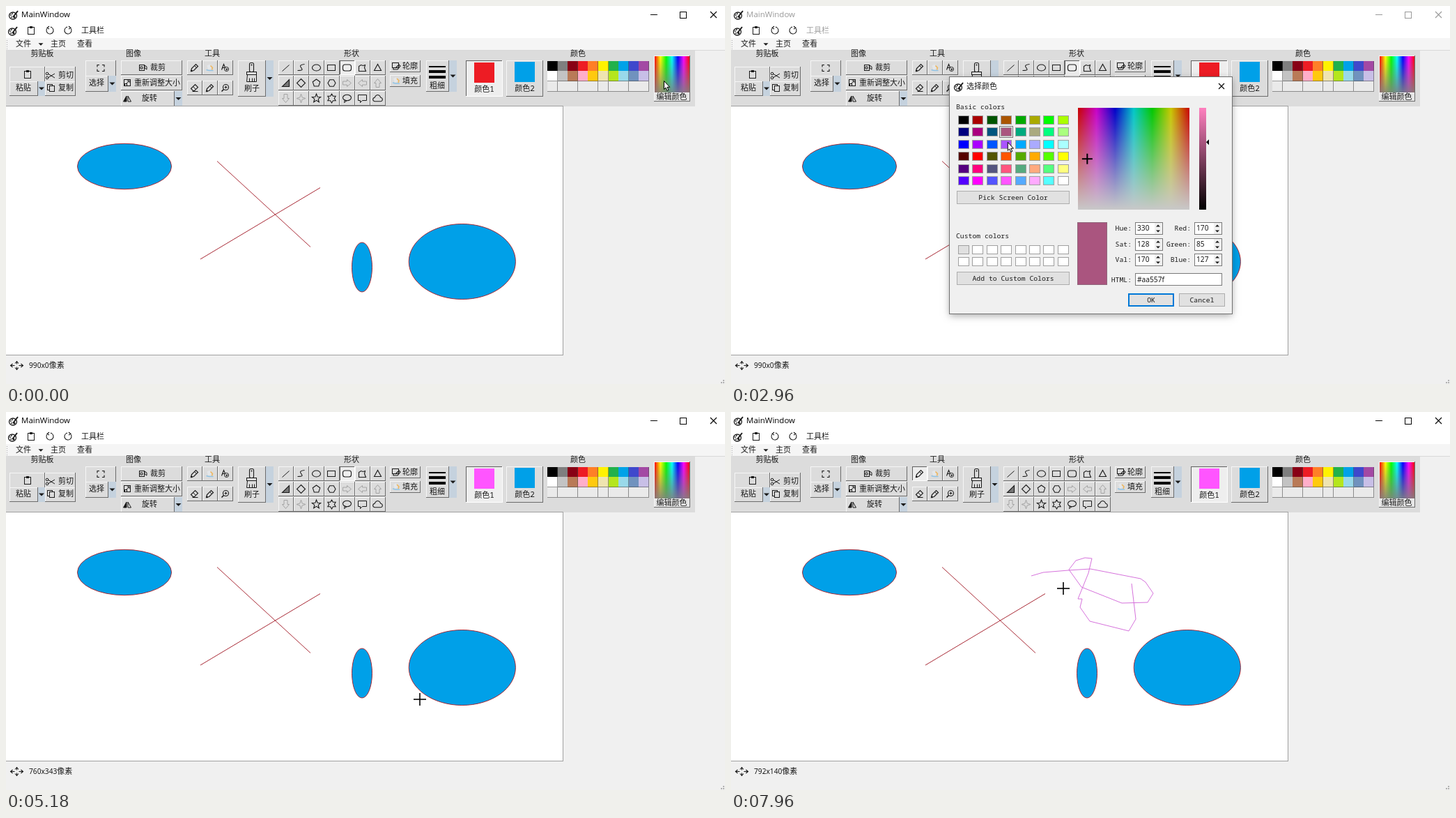
Animation, 1032 px wide and 542 px high, one loop 8000 ms. Source, as an HTML page with a canvas:

```html
<!DOCTYPE html>
<html lang="zh">
<head>
<meta charset="utf-8">
<title>Paint window</title>
<style>
html, body { margin: 0; width: 100%; height: 100%; overflow: hidden; background: #f0f0f0; }
canvas { display: block; }
</style>
</head>
<body>
<canvas id="stage" width="1032" height="542"></canvas>
<script>
const g = document.getElementById('stage').getContext('2d');
const LOOP = 8000, STEP = 70, PHASE = 50;
const OPEN = 400, CLOSE = 5110, PRESS = 6200, DRAW = 6840, DRAW_END = 7750;
const CJK = '11px "Noto Sans Mono", "Noto Sans CJK SC", "Noto Sans CJK", sans-serif';
const MONO = '9.75px "Noto Sans Mono", "Noto Sans CJK SC", "Noto Sans CJK", monospace';
const DIGITS = '10.2px "Noto Sans", sans-serif';
const TITLE = '11.5px "Open Sans", "Noto Sans", sans-serif';
const INK = '#1a1a1a', FACE = '#dcdcdc', BLUE = '#00a0e8', RED_LINE = '#aa2c38';

// ---- drawing helpers ----
function fill(x, y, w, h, c) { g.fillStyle = c; g.fillRect(x, y, w, h); }
function frame(x, y, w, h, c, lw = 1) {
  g.strokeStyle = c; g.lineWidth = lw;
  g.strokeRect(x + lw / 2, y + lw / 2, w - lw, h - lw);
}
function box(x, y, w, h, bg, edge, lw) { fill(x, y, w, h, bg); frame(x, y, w, h, edge, lw); }
function text(s, x, y, font = CJK, align = 'left', c = INK) {
  g.font = font; g.textAlign = align; g.textBaseline = 'middle'; g.fillStyle = c;
  g.fillText(s, x, y + 0.5);
}
function path(pts, c = INK, lw = 1, closed = false, paint = null) {
  g.beginPath();
  pts.forEach(([x, y]) => g.lineTo(x, y));
  if (closed) g.closePath();
  if (paint) { g.fillStyle = paint; g.fill(); }
  if (c) { g.strokeStyle = c; g.lineWidth = lw; g.stroke(); }
}
function oval(x, y, rx, ry, c = INK, lw = 1, paint = null) {
  g.beginPath(); g.ellipse(x, y, rx, ry, 0, 0, 2 * Math.PI);
  if (paint) { g.fillStyle = paint; g.fill(); }
  if (c) { g.strokeStyle = c; g.lineWidth = lw; g.stroke(); }
}
function at(x, y, pts) { return pts.map(p => [x + p[0], y + p[1]]); }
function ring(x, y, n, r, inner = r, turn = -Math.PI / 2) {
  const count = inner === r ? n : 2 * n;
  return Array.from({ length: count }, (_, i) => {
    const a = turn + i * 2 * Math.PI / count, d = i % 2 && count > n ? inner : r;
    return [x + d * Math.cos(a), y + d * Math.sin(a)];
  });
}
function button(x, y, w, h, down = false, bg = FACE) {
  fill(x, y, w, h, down ? '#eeeeee' : bg);
  const [a, b] = down ? ['#606060', '#ffffff'] : ['#f6f6f6', '#6c6c6c'];
  fill(x, y, w, 1, a); fill(x, y, 1, h, a);
  fill(x, y + h - 1, w, 1, b); fill(x + w - 1, y, 1, h, b);
}
function wedge(x, y, s = 4, up = false) {
  const d = up ? -s / 2 : s / 2;
  path([[x - s, y - d], [x + s, y - d], [x, y + d]], null, 0, true, INK);
}
function dropdown(x, y, w, h) {
  fill(x, y, w, h, '#c5d2de');
  wedge(x + w / 2, y + h / 2, 4);
}
function plus(x, y, r, lw) {
  path([[x - r, y], [x + r, y]], '#000', lw);
  path([[x, y - r], [x, y + r]], '#000', lw);
}

// ---- icons ----
function paletteIcon(x, y) {
  oval(x - 1, y + 1, 5.5, 5, INK, 1.3);
  for (const [a, b] of [[-4, 0], [-2, -2], [-3, 3]]) oval(x + a, y + b, 0.9, 0.9, null, 0, INK);
  path([[x - 1, y + 3], [x + 6, y - 6]], INK, 2);
  oval(x + 1, y + 3, 1.5, 1.5, null, 0, INK);
}
function clipIcon(x, y) {
  frame(x - 5, y - 5, 10, 11, INK);
  fill(x - 2, y - 6, 4, 3, INK);
}
function turnIcon(x, y, dir) {
  g.save();
  g.translate(x, y); g.scale(dir, 1);
  g.beginPath(); g.arc(0, 0, 5, -0.5, 4.5);
  g.strokeStyle = INK; g.lineWidth = 1.1; g.stroke();
  path([[1, -6], [4, -3.5], [1, -2]], INK, 1.1);
  g.restore();
}
function scissorsIcon(x, y) {
  path(at(x, y, [[-4, -3], [6, 3]])); path(at(x, y, [[-4, 3], [6, -3]]));
  oval(x - 5, y - 3, 1.8, 1.8); oval(x - 5, y + 3, 1.8, 1.8);
}
function copyIcon(x, y) {
  frame(x - 5, y - 5, 8, 9, INK);
  box(x - 2, y - 3, 8, 9, FACE, INK);
}
function selectIcon(x, y) {
  for (const a of [-1, 1]) for (const b of [-1, 1])
    path(at(x, y, [[a * 2, b * 4.5], [a * 5, b * 4.5], [a * 5, b * 1.5]]), INK, 1.1);
}
function cropIcon(x, y) {
  frame(x - 5, y - 4, 8, 9, INK);
  path(at(x, y, [[-3, -1], [0, -1], [0, 2], [-3, 2]]), INK, 1, true);
  path(at(x, y, [[3, -3], [6, -1], [6, 3], [3, 1]]), INK, 1, true);
}
function resizeIcon(x, y) {
  frame(x - 5, y - 5, 10, 10, INK);
  frame(x - 4, y + 1, 4, 4, INK);
  path(at(x, y, [[-1, 1], [3, -3], [0, -3]])); path(at(x, y, [[3, -3], [3, 0]]));
}
function flipIcon(x, y) {
  path(at(x, y, [[-1, -4], [-1, 4], [-5.5, 4]]), INK, 1, true, INK);
  path(at(x, y, [[1, -4], [1, 4], [5.5, 4]]), INK, 1, true);
}
function pencilIcon(x, y) {
  path(at(x, y, [[-5, 5], [-4, 1], [2, -5], [5, -2], [-1, 4]]), INK, 1.2, true);
  path(at(x, y, [[0, -3], [3, 0]]));
  path(at(x, y, [[-5, 5], [-3, 4]]), INK, 2);
}
function bucketIcon(x, y) {
  path(at(x, y, [[-4, -3], [0, -5], [2, 1], [-2, 3]]), null, 0, true, '#e4e7ea');
  path(at(x, y, [[-5, 3], [-1, 4], [5, 4]]), '#8fc3e6', 1.4);
  path(at(x, y, [[1, -3], [4, 0], [3, 3]]), '#f0b65a', 1.5);
}
function letterIcon(x, y) {
  path(at(x, y, [[-5, 3], [-2, -5], [1, 2]]), INK, 1.1); path(at(x, y, [[-4, 0], [0, 0]]));
  oval(x + 2, y + 2, 3, 3, INK, 1, FACE);
  path(at(x, y, [[1, 2], [4, 2]])); path(at(x, y, [[2, 1], [2, 4]]));
}
function eraserIcon(x, y) {
  path(at(x, y, [[-5, 1], [1, -5], [5, -1], [0, 4], [-2, 4]]), INK, 1.1, true);
  path(at(x, y, [[-2, -2], [2, 2]])); path(at(x, y, [[-3, 5], [5, 5]]));
}
function lensIcon(x, y) {
  oval(x + 1, y - 1, 4, 4, INK, 1.1);
  path(at(x, y, [[-5, 5], [-2, 2]]), INK, 1.6);
  path(at(x, y, [[-1, -1], [3, -1]])); path(at(x, y, [[1, -3], [1, 1]]));
}
function brushIcon(x, y) {
  rounded(x - 2.5, y - 13.5, 6, 13, 2);
  oval(x + 0.5, y - 10.5, 0.7, 0.7);
  frame(x - 7, y - 1, 15, 5, INK);
  path(at(x + 0.5, y + 0.5, [[-6, 3], [-7, 13], [7, 13], [7, 3]]));
  for (const a of [-3, 1, 4]) path(at(x + 0.5, y + 0.5, [[a, 8], [a, 13]]));
}
function outlineIcon(x, y) {
  frame(x - 6, y - 5, 10, 8, INK);
  path(at(x, y, [[-4, 3], [-4, 5], [2, 5], [6, 0], [4, -2], [-1, 3]]), INK, 1.1);
}
function moveIcon(x, y) {
  for (let i = 0; i < 4; i++) {
    const c = Math.round(Math.cos(i * Math.PI / 2)), s = Math.round(Math.sin(i * Math.PI / 2));
    const kx = c * 9, ky = s * 6;
    path([[x + c * 3, y + s * 2], [x + kx, y + ky]], INK, 1.1);
    path([[x + kx - c * 3 - s * 2.5, y + ky - s * 3 + c * 2.5], [x + kx, y + ky],
      [x + kx - c * 3 + s * 2.5, y + ky - s * 3 - c * 2.5]], INK, 1.1);
  }
}
const ARROW = [[-6, -2.5], [0, -2.5], [0, -5], [6, 0], [0, 5], [0, 2.5], [-6, 2.5]];
function blockArrow(x, y, turns) {
  const c = Math.cos(turns * Math.PI / 2), s = Math.sin(turns * Math.PI / 2);
  path(ARROW.map(([a, b]) => [x + a * c - b * s, y + a * s + b * c]), '#a4a4a4', 1, true);
}
function rounded(x, y, w, h, r) {
  g.beginPath(); g.roundRect(x, y, w, h, r);
  g.strokeStyle = INK; g.lineWidth = 1.1; g.stroke();
}
const SHAPES = [
  (x, y) => path(at(x, y, [[-5, 5], [5, -4]])),
  (x, y) => {
    g.beginPath(); g.moveTo(x - 5, y + 4);
    g.bezierCurveTo(x + 12, y + 4, x - 11, y - 3, x + 5, y - 5);
    g.strokeStyle = INK; g.lineWidth = 1.1; g.stroke();
  },
  (x, y) => oval(x, y, 6, 4.5, INK, 1.1),
  (x, y) => frame(x - 6.5, y - 4.5, 12, 9, INK),
  (x, y) => rounded(x - 6, y - 4.5, 12, 9, 3),
  (x, y) => path(at(x, y, [[-5, 5], [-5, -2], [-2, -4], [1, -3], [4, -4], [3, 0], [5, 5]]), INK, 1.1, true),
  (x, y) => path(at(x, y, [[-5, 4], [0, -5], [5, 4]]), INK, 1.1, true),
  (x, y) => path(at(x, y, [[-5, 5], [5, 5], [5, -5]]), INK, 1.1, true, '#777'),
  (x, y) => path(ring(x, y, 4, 6), INK, 1.1, true),
  (x, y) => path(ring(x, y, 5, 5.5), INK, 1.1, true),
  (x, y) => path(ring(x, y, 6, 5.5, 5.5, 0), INK, 1.1, true),
  (x, y) => blockArrow(x, y, 0),
  (x, y) => blockArrow(x, y, 2),
  (x, y) => blockArrow(x, y, 3),
  (x, y) => blockArrow(x, y, 1),
  (x, y) => path(ring(x, y, 4, 6.5, 2.2), '#a4a4a4', 1, true),
  (x, y) => path(ring(x, y, 5, 6.5, 2.8), INK, 1.1, true),
  (x, y) => path(ring(x, y, 6, 6.5, 3.8), INK, 1.1, true),
  (x, y) => {
    oval(x, y - 1, 6, 4.2, INK, 1.1);
    path(at(x, y, [[-3, 2], [-4, 6], [0, 3]]), INK, 1);
  },
  (x, y) => path(at(x, y, [[-6, -5], [6, -5], [6, 3], [0, 3], [-3, 6], [-3, 3], [-6, 3]]), INK, 1, true),
  (x, y) => {
    g.beginPath();
    g.arc(x - 4, y + 1.5, 2.8, 1.6, 4.6); g.arc(x, y - 1, 4, 3.6, 6); g.arc(x + 4, y + 1.5, 2.8, -1.4, 1.6);
    g.closePath(); g.strokeStyle = INK; g.lineWidth = 1.1; g.stroke();
  }
];

// ---- colour ----
const css = c => `rgb(${c.join()})`;
const hex = c => '#' + c.map(v => v.toString(16).padStart(2, '0')).join('');
function toHsv([r, gr, b]) {
  const max = Math.max(r, gr, b), d = max - Math.min(r, gr, b);
  let h = 0;
  if (d) h = max === r ? ((gr - b) / d + 6) % 6 : max === gr ? (b - r) / d + 2 : (r - gr) / d + 4;
  return [Math.round(h * 60), max ? Math.round(255 * d / max) : 0, max];
}
// index runs down the columns: blue fastest, then red, then green
function basic(i) {
  return [Math.floor(i / 3) % 4 * 85, Math.floor(i / 12) * 85, Math.floor(i % 3 * 127.5)];
}
function spectrum(x, y, w, h, v, grey, reverse = false) {
  const hue = g.createLinearGradient(x, 0, x + w, 0);
  const stops = [[v, 0, 0], [v, 0, v], [0, 0, v], [0, v, v], [0, v, 0], [v, v, 0], [v, 0, 0]];
  if (reverse) stops.reverse();
  stops.forEach((c, i) => hue.addColorStop(i / 6, css(c)));
  fill(x, y, w, h, hue);
  const fade = g.createLinearGradient(0, y, 0, y + h);
  fade.addColorStop(0, `rgba(${grey},${grey},${grey},0)`);
  fade.addColorStop(1, `rgba(${grey},${grey},${grey},${reverse ? 0.9 : 1})`);
  fill(x, y, w, h, fade);
}
const PALETTE = ('000000 7f7f7f 880015 ed1c24 ff7f27 fff200 22b14c 00a2e8 3f48cc a349a4 ' +
  'ffffff c3c3c3 b97a57 ffaec9 ffc90e efe4b0 b5e61d 99d9ea 7092be c8bfe7').split(' ');

// ---- motion: [time, x, y] ----
const TRACK = [
  [0, 944, 107], [680, 944, 107], [900, 560, 190], [1170, 383, 222], [1240, 382, 222],
  [1860, 398, 172], [2750, 398, 172], [3300, 394, 246], [3650, 394, 246], [3830, 411, 254],
  [4410, 594, 412], [5250, 594, 412], [5320, 604, 405], [5860, 275, 158], [6000, 271, 91],
  [6240, 271, 91], [6700, 431, 235], [DRAW, 431, 235]
];
const STROKE = [
  [431, 235], [448, 230], [484, 227], [516, 225], [588, 239], [595, 244], [606, 260], [598, 273],
  [561, 274], [503, 251], [485, 226], [495, 213], [508, 209], [518, 210], [513, 231],
  [498, 268], [504, 268], [501, 280], [515, 300], [571, 314], [581, 297], [575, 246]
];
STROKE.forEach(([x, y], i) => {
  if (i) TRACK.push([DRAW + i / (STROKE.length - 1) * (DRAW_END - DRAW), x, y]);
});
TRACK.push([7820, 556, 226], [7890, 515, 222], [7960, 477, 253], [LOOP, 477, 253]);

function pointer(t) {
  const i = Math.max(1, TRACK.findIndex(k => k[0] > t));
  const [t0, x0, y0] = TRACK[i - 1], [t1, x1, y1] = TRACK[i];
  const k = (t - t0) / (t1 - t0);
  return [x0 + (x1 - x0) * k, y0 + (y1 - y0) * k];
}
function status(t, [x, y], onCanvas) {
  if (t < CLOSE) return '990x0';
  if (t >= 7960) return '792x140';
  return onCanvas ? `${Math.round(x * 1.28)}x${Math.round((y - 144) * 1.28)}` : '352x18';
}

// ---- main window ----
function header(t, modal) {
  const c = modal ? '#999' : '#000';
  fill(0, 0, 1032, 46, '#fff');
  fill(0, 46, 1032, 18, '#f5f5f5');
  fill(0, 63, 1032, 1, '#d8d8d8');
  paletteIcon(11, 13);
  text('MainWindow', 22, 12.5, TITLE, 'left', c);
  path([[925, 12.5], [935, 12.5]], c);
  frame(967, 8, 10, 10, c);
  path([[1011, 8], [1020, 17]], c, 1.1); path([[1020, 8], [1011, 17]], c, 1.1);
  paletteIcon(10, 36); clipIcon(36, 35); turnIcon(63, 35, -1); turnIcon(89, 35, 1);
  text('工具栏', 108, 35.5, CJK, 'left', modal && t >= 680 ? '#a0a0a0' : INK);
  for (let y = 49; y < 62; y += 3) fill(1, y, 1, 1, '#aaa');
  text('文件', 14, 54.5); wedge(50, 55, 3.5);
  text('主页', 64, 54.5); text('查看', 102, 54.5);
}
function paletteCell(i) {
  const x = Math.round(777 + i % 10 * 14.6), y = Math.round(78.5 + Math.floor(i / 10) * 14.6);
  fill(x, y, 15, 15, i < 20 ? '#' + PALETTE[i] : '#eaeaea');
  const edge = i < 20 ? 'rgba(70,70,70,.55)' : '#8c8c8c';
  fill(x, y + 14, 15, 1, edge); fill(x + 14, y, 1, 14, edge);
}
function ribbon(t) {
  fill(0, 64, 989, 80, FACE);
  [['剪贴板', 52], ['图像', 183], ['工具', 296], ['形状', 496], ['颜色', 821]]
    .forEach(([s, x]) => text(s, x, 68.5, CJK, 'center'));

  button(5, 87, 51, 22); clipIcon(31, 98);
  button(5, 108, 41, 21); text('粘贴', 14, 117.5); dropdown(46, 108, 10, 21);
  button(56, 87, 44, 22); scissorsIcon(64, 100); text('剪切', 75, 99.5);
  button(56, 108, 44, 21); copyIcon(64, 117); text('复制', 75, 117.5);

  button(114, 78, 44, 23); selectIcon(136, 89);
  button(114, 100, 33, 23); text('选择', 119, 110.5); dropdown(147, 100, 11, 23);
  button(165, 78, 88, 21); cropIcon(196, 88); text('裁剪', 207, 88);
  button(165, 100, 88, 21); resizeIcon(174, 110); text('重新调整大小', 184, 110);
  button(165, 122, 77, 22); flipIcon(174, 133); text('旋转', 195, 132.5); dropdown(242, 122, 11, 22);

  [pencilIcon, bucketIcon, letterIcon, eraserIcon, pencilIcon, lensIcon].forEach((icon, i) => {
    const x = 260 + i % 3 * 22, y = i < 3 ? 78 : 107;
    button(x, y, 22, 21, i === 0 && t >= PRESS);
    icon(x + 10.5, y + 10.5);
  });
  button(333, 78, 40, 52); brushIcon(352, 95); text('刷子', 342, 118.5); dropdown(373, 78, 11, 52);

  SHAPES.forEach((shape, i) => {
    const x = 391 + i % 7 * 22, y = 78 + Math.floor(i / 7) * 22;
    button(x, y, 22, 21, i === 4 && t < PRESS);
    shape(x + 10.5, y + 10.5);
  });
  button(551, 78, 44, 17); outlineIcon(560, 86); text('轮廓', 569, 86);
  button(551, 99, 44, 17); bucketIcon(560, 107); text('填充', 569, 107);

  button(603, 78, 33, 45);
  [[86, 2], [92, 4], [100, 4]].forEach(([y, h]) => fill(607, y, 24, h, '#000'));
  text('粗细', 608, 114.5); dropdown(636, 78, 11, 45);

  button(660, 78, 53, 52, true);
  fill(672, 81, 29, 29, t >= CLOSE ? '#ff55ff' : '#ed1c24');
  text('颜色1', 686.5, 119.5, CJK, 'center');
  button(718, 78, 53, 52);
  fill(730, 80, 29, 29, BLUE);
  text('颜色2', 744.5, 118.5, CJK, 'center');

  for (let i = 0; i < 30; i++) paletteCell(i);
  button(930, 71, 52, 54);
  spectrum(931, 72, 50, 52, 255, 128, true);
  button(930, 124, 52, 13, false, '#e6e6e6');
  text('编辑颜色', 955.5, 130, CJK, 'center');
}
function sheet(t) {
  box(-1, 143, 801, 358, '#fff', '#a0a0a0');
  [[170, 230, 67.5, 32.7], [511, 374.5, 14.5, 35.5], [654.8, 366.5, 76.6, 54]]
    .forEach(e => oval(...e, RED_LINE, 1, BLUE));
  path([[303, 222.5], [437, 345.5]], RED_LINE);
  path([[451, 260.5], [279, 363]], RED_LINE);
  if (t > DRAW) {
    const n = (STROKE.length - 1) * Math.min(1, (t - DRAW) / (DRAW_END - DRAW));
    const pts = STROKE.slice(0, Math.floor(n) + 1);
    if (t < DRAW_END) pts.push(pointer(t));
    path(pts, '#d672dc', 1);
  }
}

// ---- colour dialog ----
function flatButton(s, x, y, w, h, bg = '#e1e1e1', edge = '#adadad', lw = 1) {
  box(x, y, w, h, bg, edge, lw);
  text(s, x + w / 2, y + h / 2 + 0.5, MONO, 'center');
}
function spin(label, value, x, y) {
  text(label, x - 5, y, MONO, 'right');
  box(x, y - 9, 40, 18, '#fff', '#7a7a7a');
  text(value, x + 3, y, DIGITS);
  fill(x + 28, y - 8, 11, 16, '#f0f0f0');
  wedge(x + 33, y - 4, 3, true); wedge(x + 33, y + 4, 3);
}
function well(x, y, c) { box(x, y, 16, 13, c, '#a0a0a0'); }

function dialog(t, hover) {
  const pick = t < 2060 ? 9 : t < 3300 ? 19 : 23;
  const rgb = basic(pick), [h, s, v] = toHsv(rgb);
  g.save();
  g.globalAlpha = Math.min(1, (t - 330) / 150);
  g.shadowColor = 'rgba(0,0,0,.35)'; g.shadowBlur = 10; g.shadowOffsetY = 3;
  fill(314, 102, 405, 339, '#f0f0f0');
  g.shadowColor = 'transparent';
  fill(314, 102, 405, 27, '#fff');
  frame(313, 101, 407, 341, '#707070');
  paletteIcon(327, 116); text('选择颜色', 338, 115.5);
  path([[700, 111], [708, 119]], '#000', 1.1); path([[708, 111], [700, 119]], '#000', 1.1);

  text('Basic colors', 323, 144.5, MONO);
  for (let i = 0; i < 48; i++) {
    const x = Math.round(326 + Math.floor(i / 6) * 20.4), y = Math.round(156.5 + i % 6 * 17.5);
    well(x, y, css(basic(i)));
    if (i === pick && t < 4900) frame(x - 2, y - 2, 20, 17, '#777');
  }
  flatButton('Pick Screen Color', 324, 265, 162, 19);
  text('Custom colors', 323, 330, MONO);
  for (let i = 0; i < 16; i++)
    well(Math.round(326 + i % 8 * 20.4), i < 8 ? 343 : 360, i ? '#fff' : '#e0e0e0');
  flatButton('Add to Custom Colors', 324, 381, 162, 19);

  spectrum(498, 146, 160, 146, 200, 200);
  g.save();
  g.beginPath(); g.rect(498, 146, 161, 147); g.clip();
  plus(498 + (1 - h / 360) * 160, 147 + (1 - s / 255) * 145, 7.5, 2);
  g.restore();
  const ramp = g.createLinearGradient(0, 146, 0, 292);
  ramp.addColorStop(0, css(rgb.map(c => Math.round(c * 255 / v))));
  ramp.addColorStop(1, '#000');
  fill(672, 146, 10, 146, ramp);
  const my = 147 + (1 - v / 255) * 145;
  path([[682, my], [686, my - 4], [686, my + 4]], null, 0, true, '#000');

  box(497, 310, 43, 90, css(rgb), 'rgba(120,120,120,.5)');
  const rowY = i => Math.floor(319.5 + i * 22.5);
  [['Hue:', h], ['Sat:', s], ['Val:', v]].forEach(([n, k], i) => spin(n, k, 580, rowY(i)));
  ['Red:', 'Green:', 'Blue:'].forEach((n, i) => spin(n, rgb[i], 665, rowY(i)));
  text('HTML:', 575, 392.5, MONO, 'right');
  box(580, 383, 125, 18, '#fff', '#7a7a7a');
  text(hex(rgb), 583, 392.5, DIGITS);
  flatButton('OK', 570, 412, 66, 19, hover ? '#dde8f1' : '#e1e1e1', '#0078d7', hover ? 1.4 : 2);
  flatButton('Cancel', 643, 412, 66, 19);
  g.restore();
}

function cursor(x, y) {
  path(at(x, y, [[0.5, 0.5], [0.5, 12.5], [3, 10], [5, 14.5], [7, 13.5], [5, 9.3], [8.7, 9.3]]), '#000', 1, true, '#fff');
}

function draw(now) {
  const raw = now % LOOP;
  const t = Math.max(0, Math.floor((raw - PHASE) / STEP) * STEP + PHASE);
  const modal = t >= OPEN && t < CLOSE, pos = pointer(t), [x, y] = pos;
  const onCanvas = t >= CLOSE && y > 144 && y < 500 && x < 799;
  fill(0, 0, 1032, 542, '#f0f0f0');
  header(t, modal);
  ribbon(t);
  sheet(t);
  moveIcon(15.5, 515.5);
  const size = status(t, pos, onCanvas);
  text(size, 33, 515.5, DIGITS);
  text('像素', 33 + g.measureText(size).width, 515.5);
  for (const [a, b] of [[1029, 539], [1026, 539], [1029, 536]]) fill(a, b, 2, 2, '#b0b0b0');
  if (modal) dialog(t, t >= 4340);
  if (onCanvas) plus(x, y, 9, 1.6); else cursor(x, y);
}

let start;
function tick(now) {
  start ??= now;
  draw(now - start);
  requestAnimationFrame(tick);
}
requestAnimationFrame(tick);
</script>
</body>
</html>
```
